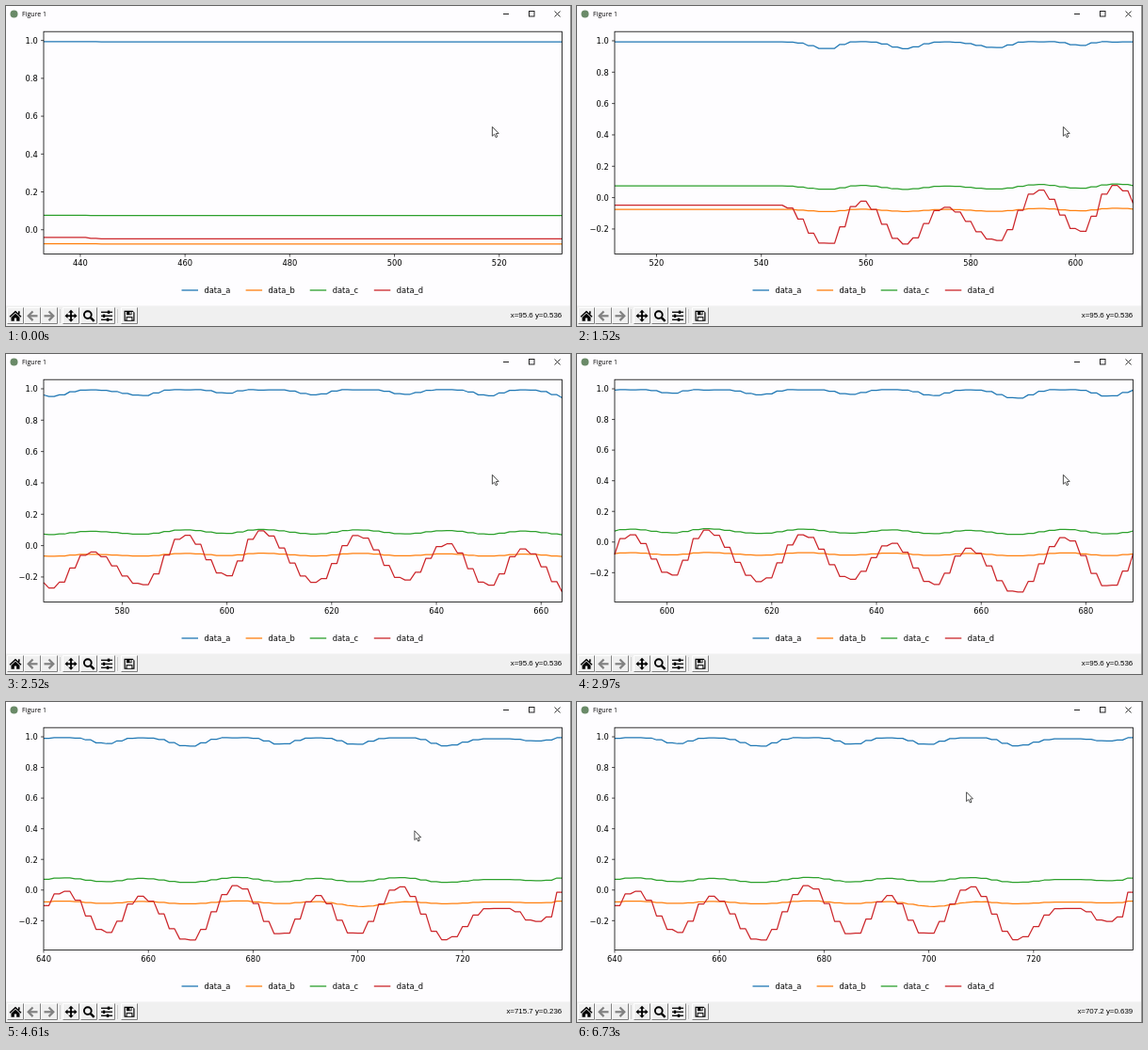
Animation of 600x340 px, one loop 6.76 s. Source, as an HTML page with a canvas:

```html
<!DOCTYPE html>
<html lang="en">
<head>
<meta charset="utf-8">
<title>Figure 1</title>
<style>
html, body { margin: 0; width: 100%; height: 100%; overflow: hidden; background: #fff; }
canvas { display: block; width: 600px; height: 340px; }
</style>
</head>
<body>
<canvas id="stage" width="600" height="340"></canvas>
<script>
const g = document.getElementById('stage').getContext('2d');
const LOOP = 6760, SPAN = 99, FIRST = 430, END = 640;
const BOX = { l: 40, r: 590.5, t: 27.2, b: 263.5 };
const COLORS = ['#1f77b4', '#ff7f0e', '#2ca02c', '#cc262b'];
const NAMES = ['data_a', 'data_b', 'data_c', 'data_d'];
const PLOT_FONT = '8.3px "DejaVu Sans", sans-serif';

// Turning points of data_d: sample index, level in hundredths
const SWINGS = [
  [442.5, -4], [446, -4.8], [545, -4.8], [553.7, -30.2], [560, -2], [568.5, -29.5], [576, -6],
  [586, -27.6], [594, 5], [602, -22], [608.3, 7.8], [619, -26], [627, 5], [636, -24.5], [644, -0.5],
  [652, -28], [658.5, -4], [667.7, -33.2], [677, 3.1], [685.5, -29.5], [692.3, -3.5], [699.5, -29.2],
  [708, 2.3], [716.8, -32.5], [725, -12], [729, -12], [733.5, -20.5], [735.5, -20.5], [740, 5]
];
// Pointer tip: time, x, y
const POINTER = [[4200, 516.4, 128.4], [4400, 494, 156], [4520, 461, 161.6], [4610, 434, 137], [4800, 413.6, 95.8]];
const READOUT_LAG = 90;

const linear = u => u;
const cosine = u => (1 - Math.cos(Math.PI * u)) / 2;

// Value of one column at x, eased between neighbouring key points
function track(keys, x, ease = linear, col = 1) {
  const i = keys.findIndex(k => k[0] > x);
  if (i === 0) return keys[0][col];
  if (i < 0) return keys[keys.length - 1][col];
  const a = keys[i - 1], b = keys[i];
  return a[col] + (b[col] - a[col]) * ease((x - a[0]) / (b[0] - a[0]));
}

// The four series form a unit quaternion; each reading is held for two samples
function sample(x) {
  const held = 2 * Math.floor(x / 2) + .5;
  const d = track(SWINGS, held, cosine) / 100;
  const b = -.072 + .055 * d - .021 * Math.exp(-(((x - 702) / 6) ** 2));
  const c = .0795 + .09 * d;
  return [Math.sqrt(1 - b * b - c * c - d * d), b, c, d];
}
const samples = Array.from({ length: END + SPAN + 1 - FIRST }, (_, i) => sample(FIRST + i));

function view(left) {
  const rows = samples.slice(left - FIRST, left - FIRST + SPAN + 1);
  const all = rows.flat();
  const lo = Math.min(...all), hi = Math.max(...all), pad = (hi - lo) * .05;
  const sx = (BOX.r - BOX.l) / SPAN, sy = (BOX.b - BOX.t) / (hi - lo + 2 * pad);
  return {
    left, rows, lo: lo - pad, hi: hi + pad,
    x: v => BOX.l + (v - left) * sx,
    y: v => BOX.t + (hi + pad - v) * sy,
    invX: px => left + (px - BOX.l) / sx,
    invY: py => hi + pad - (py - BOX.t) / sy
  };
}

function path(points, close) {
  g.beginPath();
  for (let i = 0; i < points.length; i += 2) g.lineTo(points[i], points[i + 1]);
  if (close) g.closePath();
}
function line(color, width, ...points) {
  g.strokeStyle = color;
  g.lineWidth = width;
  path(points);
  g.stroke();
}
function poly(color, ...points) {
  g.fillStyle = color;
  path(points, true);
  g.fill();
}
function rect(color, x, y, w, h) {
  g.fillStyle = color;
  g.fillRect(x, y, w, h);
}
function circle(x, y, r) {
  g.beginPath();
  g.arc(x, y, r, 0, 7);
}
function text(str, x, y, font, align = 'left') {
  g.font = font;
  g.textAlign = align;
  g.fillStyle = '#000';
  g.fillText(str, x, y);
}

function titleBar() {
  g.fillStyle = '#6a8a68';
  circle(8.5, 8.5, 4);
  g.fill();
  text('Figure 1', 17, 11.3, '7px "Open Sans", sans-serif');
  line('#222', 1, 528, 8.5, 534, 8.5);
  g.strokeRect(555.5, 5.5, 5.5, 5.5);
  line('#222', .9, 582.5, 5.5, 588.5, 11.5);
  line('#222', .9, 588.5, 5.5, 582.5, 11.5);
}

function arrow(dir) {
  g.scale(dir, 1);
  line('#808080', 2.2, .5, -4.8, -4.3, 0, .5, 4.8);
  line('#808080', 2.2, -4, 0, 5.5, 0);
}
function home() {
  poly('#000', -6.5, .5, 0, -5.5, 6.5, .5, 5.5, 1.5, 0, -3.5, -5.5, 1.5);
  poly('#000', -4.5, 1.5, 0, -2.5, 4.5, 1.5, 4.5, 5.5, 1.2, 5.5, 1.2, 2.2, -1.2, 2.2, -1.2, 5.5, -4.5, 5.5);
  rect('#000', 3, -5, 1.6, 3);
}
function pan() {
  for (let i = 0; i < 4; i++) {
    rect('#000', -.9, -.9, 5.4, 1.8);
    poly('#000', 6.5, 0, 3.5, -2.8, 3.5, 2.8);
    g.rotate(Math.PI / 2);
  }
}
function zoom() {
  g.strokeStyle = '#000';
  g.lineWidth = 1.9;
  circle(-1.2, -1.2, 3.9);
  g.stroke();
  line('#000', 2.4, 1.8, 1.8, 5.6, 5.6);
}
function sliders() {
  [2, -3, 1].forEach((x, i) => {
    const y = 4 * i - 4;
    line('#000', 1.3, -6, y, 6, y);
    rect('#000', x - 1.2, y - 1.7, 2.4, 3.4);
  });
}
function save() {
  poly('#000', -5.5, -5.5, 3.5, -5.5, 5.5, -3.5, 5.5, 5.5, -5.5, 5.5);
  rect('#f0f0f0', -4.3, -4.3, 8.6, 8.6);
  rect('#000', -3, -5, 5.5, 4);
  rect('#f0f0f0', .4, -4.3, 1.3, 2.5);
  rect('#000', -3.4, .8, 6.8, 4.5);
  rect('#f0f0f0', -2.4, 1.8, 4.8, 3);
}
const BUTTONS = [
  [10, home], [28, () => arrow(1)], [46, () => arrow(-1)],
  [69, pan], [88, zoom], [107, sliders], [131, save]
];

function toolbar() {
  rect('#f0f0f0', 0, 318.5, 600, 21.5);
  for (const [x, icon] of BUTTONS) {
    line('#fff', 1, x - 8.5, 337, x - 8.5, 320.5, x + 8.5, 320.5);
    line('#808080', 1, x - 8.5, 337.5, x + 8.5, 337.5, x + 8.5, 320.5);
    g.save();
    g.translate(x, 329.3);
    icon();
    g.restore();
  }
  for (const x of [57.5, 118.5]) line('#c8c8c8', .8, x, 322, x, 337);
}

function axes(v) {
  for (let x = Math.ceil(v.left / 20) * 20; x <= v.left + SPAN; x += 20) {
    line('#000', .7, v.x(x), BOX.b, v.x(x), BOX.b + 3);
    text(x, v.x(x), 276, PLOT_FONT, 'center');
  }
  for (let k = Math.ceil(v.lo * 5); k <= v.hi * 5; k++) {
    const y = v.y(k / 5);
    line('#000', .7, BOX.l - 3, y, BOX.l, y);
    text((k < 0 ? '\u2212' : '') + Math.abs(k / 5).toFixed(1), 33.7, y + 3.3, PLOT_FONT, 'right');
  }
}

function series(v) {
  g.lineJoin = 'round';
  COLORS.forEach((color, k) =>
    line(color, 1.25, ...v.rows.flatMap((row, i) => [v.x(v.left + i), v.y(row[k])])));
  g.lineJoin = 'miter';
  g.strokeStyle = '#000';
  g.lineWidth = .8;
  g.strokeRect(BOX.l, BOX.t, BOX.r - BOX.l, BOX.b - BOX.t);
}

function legend() {
  NAMES.forEach((name, i) => {
    const x = 186.5 + i * 68.1;
    line(COLORS[i], 1.3, x, 302, x + 17.5, 302);
    text(name, x + 24, 304.8, PLOT_FONT);
  });
}

function pointer(x, y) {
  g.save();
  g.translate(x, y);
  poly('#fff', 0, 0, 0, 9.8, 2.2, 7.8, 3.8, 11.2, 5.4, 10.5, 3.9, 7.2, 6.8, 7);
  g.strokeStyle = '#222';
  g.lineWidth = .8;
  g.stroke();
  g.restore();
}

function pointerAt(t) {
  return [track(POINTER, t, linear, 1), track(POINTER, t, linear, 2)];
}

function readout(t, v) {
  const seen = t - READOUT_LAG;
  const [px, py] = pointerAt(seen);
  const [x, y] = seen < POINTER[0][0] ? [95.6, .536] : [v.invX(px), v.invY(py)];
  text(`x=${x.toFixed(1)} y=${y.toFixed(3)}`, 590.2, 331.2,
    '7.9px "Liberation Sans", Arial, sans-serif', 'right');
}

function render(t) {
  // Scrolling gains a little speed; the curves run ahead of the axis labels
  const pos = 433.9 + .0507 * t + 6.2e-7 * t * t;
  const ticks = view(Math.min(END, Math.floor(pos)));
  const curves = view(Math.min(END, Math.floor(pos + 1.5)));

  rect('#fefdff', 0, 0, 600, 340);
  titleBar();
  axes(ticks);
  series(curves);
  legend();
  toolbar();
  readout(t, ticks);
  line('#999', 1, 599.5, 0, 599.5, 340);
  pointer(...pointerAt(t));
}

const start = performance.now();
function frame() {
  render((performance.now() - start) % LOOP);
  requestAnimationFrame(frame);
}
frame();
</script>
</body>
</html>
```
